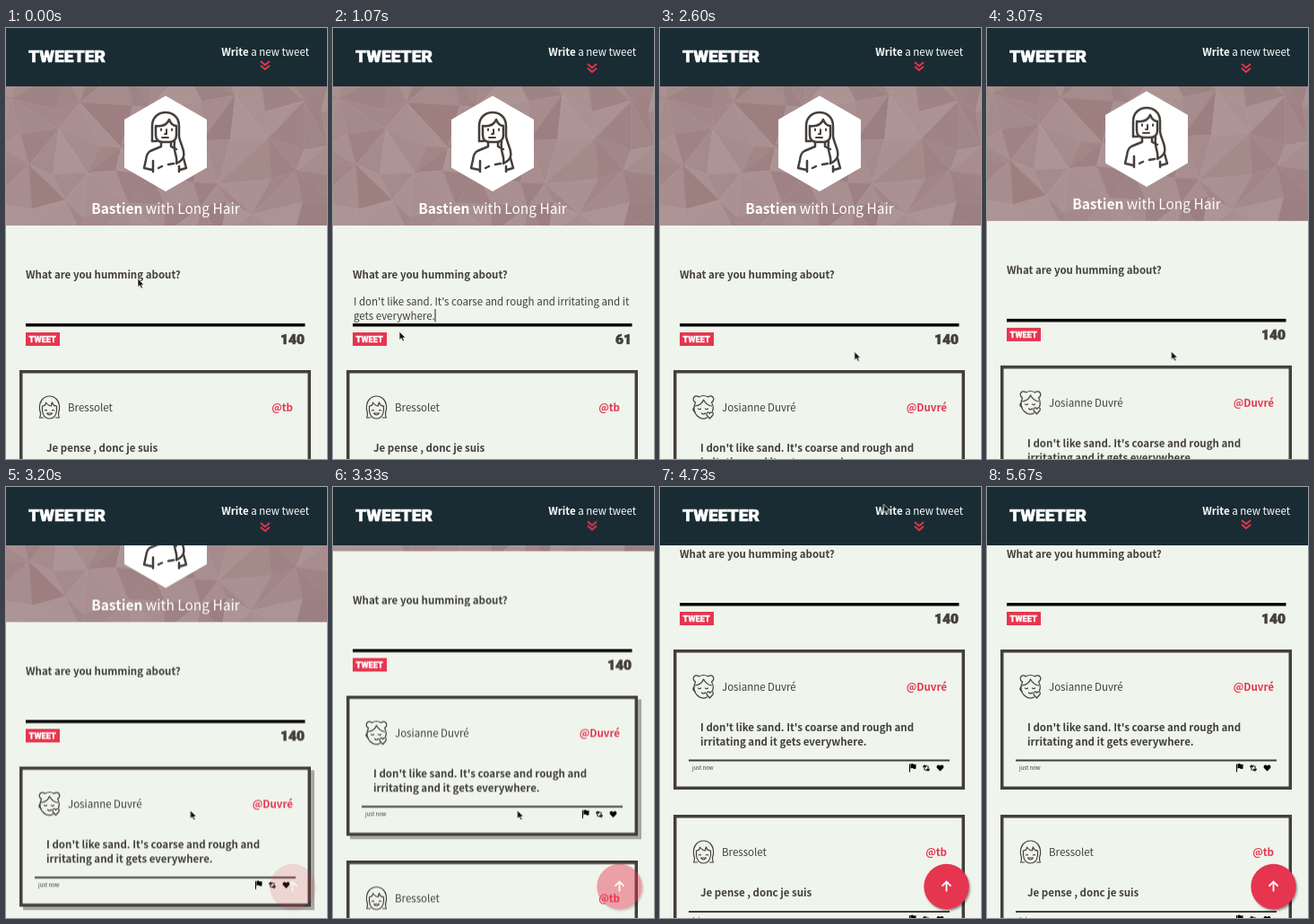
An HTML page for the animation above (5790 ms loop, 358 by 480 pixels).

```html
<!DOCTYPE html>
<html lang="en">
<head>
<meta charset="utf-8">
<title>Tweeter</title>
<style>
:root { --ink: #443f3b; --red: #e6354f; --paper: #eff4ec; --loop: 5.79s; }
html, body { margin: 0; width: 100%; height: 100%; overflow: hidden; background: var(--paper); }
svg { display: block; width: 100%; height: 100%; }
text { font: 11.5px "Noto Sans CJK JP", "Noto Sans CJK SC", "Noto Sans CJK", sans-serif; fill: var(--ink); white-space: pre; }
.light { font-weight: 300; }
.bold { font-weight: 700; }
.end { text-anchor: end; }
.block { font-family: Roboto, Inter, sans-serif; font-weight: 900; stroke-width: .6; }
.line { fill: none; stroke: var(--ink); stroke-linecap: round; stroke-linejoin: round; }
.meta { font-size: 6px; }

#page { animation: scroll var(--loop) linear infinite; }
#bounce { animation: bounce var(--loop) ease-in-out infinite; }
#fab { animation: fade var(--loop) linear infinite; }
#cursor { animation: travel var(--loop) linear infinite; }
#older { animation: push var(--loop) step-end infinite; }
#newer { animation: arrive var(--loop) step-end infinite; }
#lift { animation: lift var(--loop) step-end infinite; }
#focus { animation: focus var(--loop) step-end infinite; }
.draft { animation: draft var(--loop) step-end infinite; }
#full { animation: full var(--loop) step-end infinite; }
.hover { animation: hover var(--loop) step-end infinite; }
#arrow { animation: arrow var(--loop) step-end infinite; }

@keyframes scroll {
  0%, 51.8% { transform: none; }
  53% { transform: translateY(-4px); }
  55.3% { transform: translateY(-70px); }
  57.5% { transform: translateY(-148px); }
  59.9% { transform: translateY(-188px); }
  62.2%, 100% { transform: translateY(-200px); }
}
@keyframes bounce {
  0%, 5%, 26%, 40%, 60.5%, 74%, 95%, 100% { transform: none; }
  17.5%, 20%, 52%, 54.5%, 86.5%, 89% { transform: translateY(3px); }
}
@keyframes fade {
  0%, 54% { opacity: 0; }
  62%, 100% { opacity: 1; }
}
@keyframes travel {
  0% { transform: translate(147px, 279px); }
  4.7% { transform: translate(140px, 308px); }
  10.4% { transform: translate(98px, 338px); }
  18.4%, 21.9% { transform: translate(74px, 338px); }
  26.4%, 38% { transform: translate(48px, 346px); }
  40.2%, 42.6% { transform: translate(239px, 361px); }
  46.1%, 62.2% { transform: translate(205.5px, 360px); }
  67.8% { transform: translate(235.5px, 218px); }
  70.3%, 73.7% { transform: translate(240px, 142px); }
  84%, 100% { transform: translate(252px, -16px); }
}
@keyframes push { 0% { transform: none; } 42.6%, 100% { transform: translateY(184px); } }
@keyframes arrive { 0% { opacity: 0; } 42.6%, 100% { opacity: 1; } }
@keyframes lift { 0% { opacity: 0; } 53.7% { opacity: 1; } 68.7%, 100% { opacity: 0; } }
@keyframes focus { 0% { opacity: 0; } 5.7% { opacity: 1; } 11.5%, 100% { opacity: 0; } }
@keyframes draft { 0% { opacity: 0; } 11.5% { opacity: 1; } 28.8%, 100% { opacity: 0; } }
@keyframes full { 0% { opacity: 1; } 11.5% { opacity: 0; } 28.8%, 100% { opacity: 1; } }
@keyframes hover { 0% { opacity: 0; } 25.5% { opacity: 1; } 38.6%, 100% { opacity: 0; } }
@keyframes arrow { 0% { opacity: 1; } 25.5% { opacity: 0; } 38.6%, 100% { opacity: 1; } }
</style>
</head>
<body>
<svg viewBox="0 0 358 480">
  <defs>
    <filter id="soft" x="-20%" y="-20%" width="140%" height="140%"><feGaussianBlur stdDeviation="1"/></filter>
    <clipPath id="bannerClip"><path d="M0 65H358V220H0z"/></clipPath>
    <g id="actions">
      <path d="M278 -4h1v9h-1zM279.500 -4q2 -1 3 0t3 0v5q-2 1 -3 0t-3 0z"/>
      <path d="M295 3V-2H298M299 -2V3H296M293.300 -0.500L295 -2.500L296.700 -0.500M297.300 1.500L299 3.500L300.700 1.500" fill="none" stroke="#222" stroke-width="1.200"/>
      <path d="M312.500 4L309 0.500C307.500 -2 310.500 -4.500 312.500 -2C314.500 -4.500 317.500 -2 316 0.500z"/>
    </g>
  </defs>

  <g id="page">
    <g id="mesh" clip-path="url(#bannerClip)"></g>
    <path d="M178 75.500L224 102V155.500L178 182L132 155.500V102z" fill="#fff"/>
    <g class="line" stroke-width="2.500">
      <path d="M163 126V109C163 89 193 89 193 109V121C195 131 200 137 198 143C197 147 194 149 190 151C192 143 186 138 188 127"/>
      <path d="M167 109C175 110 180 107 182 102C184 107 187 109 190 109V119Q190 127 182 127H175Q167 127 167 119zM163 126H168"/>
      <path d="M173 128V132L161 137Q157 139 156 147L154 156L163 158M184 128V132L190 135M198 145L201 156L194 158M164 148V160M193 154V160M170 156L174 154M181 152L187 151"/>
      <path d="M173 112.500V114M185 112.500V114M179 113V118H177M174 122H181" stroke-width="2"/>
    </g>
    <text x="178" y="207" text-anchor="middle" style="font-size:15.500px;fill:#fff"><tspan class="bold">Bastien</tspan><tspan class="light"> with Long Hair</tspan></text>

    <text class="bold" x="22" y="279">What are you humming about?</text>
    <path id="focus" d="M23.500 298V312" stroke="#222"/>
    <g class="draft">
      <text x="23" y="309">I don't like sand. It's coarse and rough and irritating and it</text>
      <text x="23" y="324.500">gets everywhere.</text>
      <path d="M114 313V327.500" stroke="#222"/>
    </g>
    <path d="M22 329H333.500V332.500H22z" fill="#050505"/>
    <path class="hover" d="M24 341.500H62V357H24z" fill="#9da19c"/>
    <path d="M22 339H60V354H22z" fill="var(--red)"/>
    <text class="block" x="25.500" y="350" style="font-size:9.300px;fill:#fff;stroke:#fff;stroke-width:.3">TWEET</text>
    <g class="block" style="stroke:var(--ink)">
      <text id="full" class="block end" x="333" y="352" style="font-size:15.500px">140</text>
      <text class="block end draft" x="333" y="352" style="font-size:15.500px">61</text>
    </g>

    <g id="older">
      <rect x="16.750" y="382.750" width="321.500" height="137" fill="var(--paper)" stroke="var(--ink)" stroke-width="3.500"/>
      <g class="line" transform="translate(48.500 422)" stroke-width="1.200">
        <path d="M-7 12H-11Q-9 9 -11 3C-13 -17 13 -17 11 3Q9 9 11 12H7"/>
        <path d="M-8 -1V4Q-7 13 0 13T8 4V-1M-8 -1Q-4 -1 -4 -5Q-1 -1 2 -1Q2 -4 3 -5Q4 -1 8 -1M-5 4Q-4 2.500 -3 4M3 4Q4 2.500 5 4M-3 7Q0 11 3 7z"/>
      </g>
      <text class="light" x="69" y="426.500">Bressolet</text>
      <text class="bold end" x="320" y="426.500" style="fill:var(--red)">@tb</text>
      <text class="bold" x="45" y="472">Je pense , donc je suis</text>
      <path d="M32 489H323" stroke="var(--ink)" stroke-width="1.800"/>
      <text class="meta" x="36" y="499.500">1 day ago</text>
      <use href="#actions" y="497"/>
    </g>

    <g id="newer">
      <path id="lift" d="M19 385H344V541H19z" fill="#a5a8a3"/>
      <rect x="16.750" y="382.750" width="321.500" height="152.500" fill="var(--paper)" stroke="var(--ink)" stroke-width="3.500"/>
      <g class="line" transform="translate(48.500 422)" stroke-width="1.200">
        <path d="M-9 -5C-14 -8 -10 -15 -5 -11Q0 -14 5 -11C10 -15 14 -8 9 -5Q12 0 10 5M4 12Q-2 15 -7 10Q-13 4 -9 -5M-9 -1Q-2 -2 0 -8Q3 -2 9 -1M-6 2Q-5 3.500 -3 2M2 2Q3 3.500 5 2M-2 7Q0 9 2 7M-11 1Q-13 4 -9 6"/>
        <path d="M7 13L3.500 9C3 5.500 6 5 7 7.500C8 5 12 5.500 10.500 9z"/>
      </g>
      <text class="light" x="69" y="426.500">Josianne Duvré</text>
      <text class="bold end" x="320" y="426.500" style="fill:var(--red)">@Duvré</text>
      <text class="bold" x="45" y="472">I don't like sand. It's coarse and rough and</text>
      <text class="bold" x="45" y="487.500">irritating and it gets everywhere.</text>
      <path d="M32 504.500H323" stroke="var(--ink)" stroke-width="1.800"/>
      <text class="meta" x="36" y="515">just now</text>
      <use href="#actions" y="512.500"/>
    </g>
  </g>

  <path d="M0 0H358V65H0z" fill="#192c33"/>
  <text class="block" x="25" y="38" style="font-size:19.200px;fill:#fff;stroke:#fff">TWEETER</text>
  <text class="end" x="338" y="30.500" style="fill:#fff"><tspan class="bold">Write</tspan><tspan class="light"> a new tweet</tspan></text>
  <path id="bounce" d="M284 37L289 41.300L294 37M284 41.700L289 46L294 41.700" fill="none" stroke="var(--red)" stroke-width="1.900"/>

  <g id="fab">
    <circle cx="321" cy="447" r="25" fill="#000" opacity=".4" filter="url(#soft)"/>
    <circle cx="319.500" cy="445" r="25.200" fill="var(--red)"/>
    <path d="M319.500 450.500V440M314.500 444.500L319.500 439.500L324.500 444.500" fill="none" stroke="#fff" stroke-width="1.800"/>
  </g>

  <g id="cursor">
    <path id="arrow" d="M0 0V9.500L2.200 7.500L3.800 11L5.500 10.200L4 7H7z" fill="#111" stroke="#fff" stroke-width=".7"/>
    <path class="hover" d="M-1 5.500V0.500Q0 -1 1 0.500V4L5.500 5Q7 5.500 6.500 8L5.500 11H0L-3.500 6.500Q-3 5 -1 7z" fill="#fff" stroke="#111" stroke-width=".9"/>
  </g>
</svg>
<script>
// Faceted banner: a jittered grid split into softly shaded triangles.
const mesh = document.getElementById('mesh');
let seed = 11;
const random = () => (seed = (seed * 16807) % 2147483647) / 2147483647;
const cols = 11, rows = 5, cell = 38;
const points = Array.from({ length: (cols + 1) * (rows + 1) }, (_, i) => [
  (i % (cols + 1)) * cell - 20 + random() * 24 - 12,
  Math.floor(i / (cols + 1)) * cell + 48 + random() * 24 - 12
]);

function facet(...corners) {
  const shape = document.createElementNS('http://www.w3.org/2000/svg', 'polygon');
  const color = `hsl(358 13% ${55.5 + random() * 7.5}%)`;
  shape.setAttribute('points', corners.map(i => points[i]).join(' '));
  shape.setAttribute('fill', color);
  shape.setAttribute('stroke', color);
  shape.setAttribute('stroke-width', 0.6);
  mesh.append(shape);
}

for (let row = 0; row < rows; row++) {
  for (let col = 0; col < cols; col++) {
    const a = row * (cols + 1) + col, b = a + 1, c = a + cols + 1, d = c + 1;
    if ((row + col) % 2) { facet(a, b, c); facet(b, d, c); }
    else { facet(a, b, d); facet(a, d, c); }
  }
}
</script>
</body>
</html>
```
